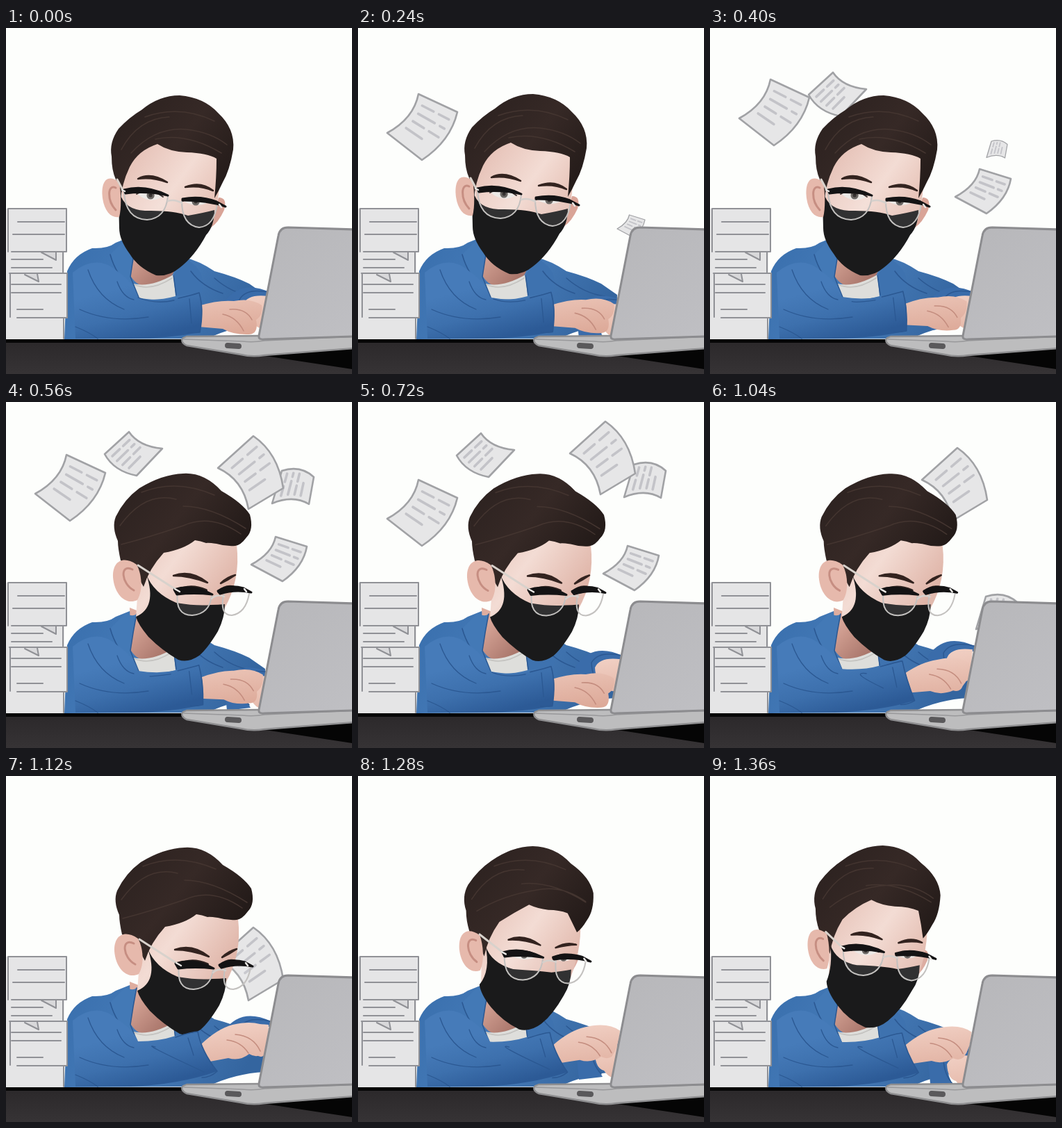
Recreate the animation shown at these times as an HTML page with a canvas. Size 498 px wide and 498 px high, loop 1.44 s.

```html
<!DOCTYPE html>
<html lang="en">
<head>
<meta charset="utf-8">
<title>Busy at the desk</title>
<style>
html, body { margin: 0; width: 100%; height: 100%; overflow: hidden; background: #fdfefc; }
canvas { display: block; }
</style>
</head>
<body>
<canvas id="stage" width="498" height="498"></canvas>
<script>
const ctx = document.getElementById('stage').getContext('2d');
const LOOP = 1440, STEP = 80;
const NUMBER = /-?\d*\.?\d+/g;
ctx.lineCap = ctx.lineJoin = 'round';

function gradient(x0, y0, x1, y1, ...colors) {
  const g = ctx.createLinearGradient(x0, y0, x1, y1);
  colors.forEach((c, i) => g.addColorStop(i / (colors.length - 1), c));
  return g;
}
const denim = gradient(90, 320, 330, 450, '#3a70ae', '#477cb9', '#34659f');
const sleeveBlue = gradient(180, 370, 200, 448, '#467bb9', '#3d70ad', '#2c5a96');
const skin = gradient(170, 170, 320, 280, '#e3bcb1', '#f3dcd4', '#deb2a5');
const handSkin = gradient(320, 355, 330, 442, '#f1d0c4', '#dca897');
const neckSkin = gradient(180, 310, 230, 360, '#dfad9f', '#a9766b');
const hair = gradient(160, 110, 320, 240, '#2b211f', '#362926', '#211917');
const metal = gradient(370, 290, 498, 446, '#b7b7ba', '#bfbfc3');
const desk = gradient(0, 453, 0, 498, '#2c292b', '#363335');
const FOLD = '#2b5892', GREY = '#909196';

function draw(path, fill, stroke, width = 2) {
  const p = new Path2D(path);
  if (fill) { ctx.fillStyle = fill; ctx.fill(p); }
  if (stroke) { ctx.strokeStyle = stroke; ctx.lineWidth = width; ctx.stroke(p); }
}

// Blends two paths that share the same commands.
function mix(a, b, amount) {
  const to = b.match(NUMBER);
  let i = 0;
  return a.replace(NUMBER, n => (+n + (to[i++] - n) * amount).toFixed(2) + ' ');
}

// Linear value through [time, value] pairs.
function track(keys, t) {
  const i = Math.max(1, keys.findIndex(k => k[0] >= t));
  const [t0, v0] = keys[i - 1], [t1, v1] = keys[i];
  return v0 + (v1 - v0) * (t - t0) / (t1 - t0);
}

const turnKeys = [[0, 0], [400, 0], [560, 1], [1120, 1], [1360, .32], [1440, 0]];
const headX = [[0, 0], [240, 2], [400, 0], [560, 0], [720, 3], [880, 4], [1120, 2], [1360, -3], [1440, 0]];
const headY = [[0, 0], [240, -2], [400, 0], [560, 0], [880, 1], [1120, 0], [1360, 1], [1440, 0]];
const nearLift = [[0, 0], [240, .05], [400, .15], [560, .18], [880, -.12], [1120, 1], [1360, .85], [1440, 0]];
const farDrop = [[0, 33], [240, 45], [400, 33], [560, 42], [800, 5], [880, 0], [1120, 5], [1360, 50], [1440, 33]];

// Distance below the highest point, one value per step after launch.
const flight = [0, 0, 59, 21, 9, 0, 0, 2, 13, 38, 190, 420];
// Corners run top-left, top-right, bottom-right, bottom-left of the sheet.
const sheets = [
  { delay: 0, bend: 1, corners: [[87, 74], [143, 100], [92, 169], [42, 130]] },
  { delay: 2, bend: -1, corners: [[142, 75], [177, 43], [225, 67], [188, 106]] },
  { delay: 1, bend: 1, corners: [[388, 194], [433, 208], [398, 258], [353, 234]] },
  { delay: 3, bend: 1, corners: [[383, 137], [397, 90], [443, 99], [436, 138]] },
  { delay: 4, bend: 1, corners: [[305, 74], [356, 28], [399, 103], [349, 133]] }
];

function drawSheet({ delay, bend, corners: [a, b, c, d] }, step) {
  const age = step - delay;
  if (age < 2 || age >= flight.length) return;
  const at = (u, v) => [0, 1].map(k =>
    (a[k] * (1 - u) + b[k] * u) * (1 - v) + (d[k] * (1 - u) + c[k] * u) * v
    + bend * .56 * v * (1 - v) * (b[k] - a[k]));
  const side = u => [0, 1].map(k => 2 * at(u, .5)[k] - (at(u, 0)[k] + at(u, 1)[k]) / 2);
  const cx = (a[0] + c[0]) / 2, cy = (a[1] + c[1]) / 2, size = age === 2 ? .5 : 1;
  ctx.save();
  ctx.translate(cx, cy + flight[age]);
  ctx.scale(size, size);
  ctx.translate(-cx, -cy);
  draw(`M${a}L${b}Q${side(1)} ${c}L${d}Q${side(0)} ${a}Z`, '#e6e6e7', '#a1a2a5', 2.6);
  [.18, .36, .54, .72].forEach((v, row) => {
    draw(`M${at(.16, v)}L${at(row % 2 ? .6 : .46, v)}`, null, '#c3c3c8', 3.6);
    if (row < 3) draw(`M${at(row % 2 ? .74 : .6, v)}L${at(.86, v)}`, null, '#c3c3c8', 3.6);
  });
  ctx.restore();
}

function drawBody() {
  draw('M84 448L88 350Q98 326 124 317Q146 318 158 309L178 301L256 330Q278 335 300 350Q330 358 350 368L373 384L372 426Q330 428 290 447Z', denim);
  draw('M178 296L180 358Q190 374 210 372Q236 366 242 350L238 320Z', neckSkin);
  draw('M183 368Q208 374 241 355L244 386Q215 394 190 389Z', '#dededb');
  draw('M184 369Q208 380 239 360', null, '#c4c3c0', 1.5);
  draw('M172 304Q182 310 188 305Q183 330 179 358Q190 384 192 392Q158 360 150 326Z', '#4379b6');
  draw('M188 305Q183 330 179 358L192 390M150 326Q158 356 184 380', null, FOLD, 1.5);
  draw('M262 334Q247 345 241 356L245 386L282 380Q288 350 262 334Z', '#3e72af');
  draw('M241 356L245 384M266 350Q282 372 312 382M300 360Q325 382 355 386', null, FOLD, 1.5);
}

function drawHead(turn) {
  const part = (front, side, fill, stroke, width) => draw(mix(front, side, turn), fill, stroke, width);
  part('M306 244Q319 244 314 262Q306 280 294 288Z', 'M318 260Q322 262 320 270Q316 280 312 285Z', '#d9a497');
  part('M166 222Q178 190 200 165Q250 160 306 182Q312 225 298 282Q240 306 168 280Z',
       'M192 240Q215 205 240 195Q300 190 332 206Q338 256 314 298Q240 320 187 310Z', skin);
  part('M164 238Q170 261 200 263Q240 262 262 270Q285 266 300 262Q300 285 288 298Q272 328 250 345Q235 358 216 356Q190 345 178 325Q163 305 163 288Q162 260 164 238Z',
       'M202 248Q212 275 245 289Q275 294 295 292Q305 292 315 291Q315 310 305 330Q290 355 278 365Q262 376 248 371Q225 358 205 338Q190 320 187 309Q218 296 202 248Z', '#1a1a1b');
  part('M158 218Q152 205 152 185Q148 165 162 145Q178 128 195 118Q220 97 250 97Q285 100 305 122Q330 145 327 175Q322 205 312 222Q306 235 300 245Q303 215 303 188Q290 180 260 179Q235 178 218 167Q190 176 178 200Q166 225 165 250Q160 235 158 218Z',
       'M165 228Q161 210 161 200Q152 180 158 165Q170 140 192 124Q225 104 255 103Q285 101 310 128Q340 145 351 162Q357 184 346 195Q338 206 330 207Q316 208 303 204Q290 202 288 203Q280 200 272 199Q256 212 227 217Q206 240 198 266Q188 245 165 228Z', hair);
  part('M166 175Q190 130 235 128M180 180Q215 142 260 146Q295 150 318 168M200 128Q250 110 300 134M215 160Q260 150 310 180',
       'M164 178Q200 128 245 140M166 205Q205 195 255 178Q295 160 338 190M195 130Q245 110 300 134M255 150Q295 150 345 182', null, '#443530', 1.5);
  part('M163 222C145 208 136 222 139 245C142 265 152 274 163 272C166 260 166 240 163 222Z',
       'M188 234C168 220 153 230 154 252C156 277 172 293 189 285C198 270 195 246 188 234Z', '#e6b9ac');
  part('M158 230C146 224 145 248 158 262', 'M182 241C163 232 166 262 184 271', null, '#c68e82', 3);

  // Eyes and brows
  part('M189 239Q206 227 225 243Q207 254 189 239Z', 'M247 272Q264 262 287 272Q268 281 247 272Z', '#eae6e3');
  part('M255 249Q273 240 291 251Q274 260 255 249Z', 'M307 273Q317 264 328 268Q320 279 307 273Z', '#eae6e3');
  part('M208 241L208.2 241M273 250L273.2 250', 'M267 271L267.2 271M317 271L317.2 271', null, '#5b5754', 11 - 3 * turn);
  part('M208 241L208.2 241M273 250L273.2 250', 'M267 271L267.2 271M317 271L317.2 271', null, '#211d1c', 5);
  part('M188 239Q206 227 226 243M254 249Q273 239 292 251', 'M246 272Q264 261 288 271M306 273Q317 263 329 267', null, '#2b201e', 2 + 2 * turn);
  part('M190 217Q208 207 232 222Q210 214 190 217Z', 'M241 250Q266 241 290 260Q264 250 241 250Z', '#33231f', '#33231f', 2.5);
  part('M258 229Q280 220 298 234Q280 226 258 229Z', 'M309 261Q318 252 330 249Q320 256 309 261Z', '#33231f', '#33231f', 2.5);

  // Glasses
  part('M170 236Q172 275 203 276Q230 274 233 242', 'M247 274Q243 307 268 307Q293 305 296 279', 'rgba(255,255,255,.1)', '#c3c1bf', 2);
  part('M253 249Q253 284 278 287Q300 285 304 253', 'M314 274Q306 307 325 307Q345 304 350 276', 'rgba(255,255,255,.1)', '#c3c1bf', 2);
  part('M233 249Q243 246 253 252', 'M296 283Q303 276 314 280', null, '#d5d0cc', 2.5);
  part('M160 218L168 233', 'M190 235L243 269', null, '#d8d2cc', 3);
  part('M170 233Q200 225 233 241Q203 234 172 238Z', 'M242 270Q268 261 297 277Q270 274 246 277Z', '#141314', '#141314', 3);
  part('M254 246Q280 241 303 250L316 257Q290 248 254 248Z', 'M305 272Q320 262 342 268L353 274Q330 269 308 276Z', '#141314', '#141314', 3);
  part('M167 233L171 235M307 254L310 258', 'M243 269L250 273M343 269L346 273', null, '#e9e7e4', 2.5);
}

function drawArms(lift, drop) {
  ctx.save();
  ctx.translate(0, drop);
  draw('M314 362Q338 328 381 348L380 356Q346 349 341 366Q342 384 352 398L318 402Z', '#3a6caa');
  draw('M378 353Q348 349 341 365Q342 386 354 389Q366 406 374 394Z', handSkin);
  draw('M381 348Q346 340 336 358Q337 380 350 394', null, FOLD, 1.5);
  ctx.restore();

  const part = (low, high, fill, stroke, width) => draw(mix(low, high, lift), fill, stroke, width);
  part('M277 400Q306 391 328 393Q352 388 368 399Q370 414 360 420Q364 440 350 441Q328 442 312 433L277 430Z',
       'M281 386Q304 364 326 358Q360 350 378 363Q376 388 366 402Q358 405 350 400Q336 411 320 406L288 412Z', handSkin);
  part('M322 405Q345 403 354 420M312 412Q332 416 342 436', 'M330 372Q356 374 366 396M318 380Q338 382 349 399', null, '#c48d7f', 1.6);
  part('M96 352Q130 324 160 350Q184 366 190 388Q220 394 245 389L278 380Q286 400 279 438Q235 447 180 447L100 447Z',
       'M96 352Q130 324 160 350Q184 366 190 382Q220 382 244 374L276 368Q280 395 304 425Q250 444 180 447L100 447Z', sleeveBlue);
  part('M248 389Q270 384 278 381Q285 405 279 438Q268 439 262 438', 'M244 376Q268 368 276 368Q281 396 304 425Q294 434 282 434', null, FOLD, 1.6);
  part('M264 390L267 425M190 388Q215 398 242 392', 'M262 377Q270 402 285 426M190 382Q215 390 240 380', null, FOLD, 1.3);
  draw('M118 348Q132 390 170 405M106 405Q150 425 205 416M100 430Q120 438 132 447M160 365Q168 388 184 391', null, FOLD, 1.3);
}

function drawStack() {
  draw('M0 260H87V322H84V353H88V417H83V448H0Z', '#e5e5e6');
  draw('M3 260H87V322H8M82 322V353M5 353H88V417H16M83 417V447M3 260V322M6 353V416', null, GREY);
  draw('M17 279H84M10 297H84M8 333H53M8 345H66M8 369H79M8 381H79M16 405H53', null, GREY);
  draw('M51 323L72 334V323M27 355L47 365L45 354', '#d8d8da', GREY);
}

function drawDesk() {
  ctx.fillStyle = desk;
  ctx.fillRect(0, 448, 498, 50);
  ctx.fillStyle = '#050505';
  ctx.fillRect(0, 448, 498, 5);
  draw('M360 470L498 491V455Z', '#050505');
}

function drawLaptop() {
  draw('M260 444L364 443L502 444V461L372 471Q354 474 338 470L260 457Q250 452 255 446Z', '#bdbdbe', '#8f8f91', 2.4);
  draw('M256 448L340 451Q356 453 372 450L502 444', null, '#98989a', 1.5);
  draw('M319 457L335 458', null, '#5a595b', 8);
  draw('M364 443L392 299Q394 287 406 287L502 290V444L372 448Q363 449 364 443Z', metal, '#8c8c8f', 3);
}

function frame(now) {
  const step = Math.floor(now % LOOP / STEP), t = step * STEP;
  ctx.fillStyle = '#fdfefc';
  ctx.fillRect(0, 0, 498, 498);
  sheets.forEach(sheet => drawSheet(sheet, step));
  drawBody();
  ctx.save();
  ctx.translate(track(headX, t), track(headY, t));
  drawHead(track(turnKeys, t));
  ctx.restore();
  drawArms(track(nearLift, t), track(farDrop, t));
  drawStack();
  drawDesk();
  drawLaptop();
}

const start = performance.now();
function tick() {
  frame(performance.now() - start);
  requestAnimationFrame(tick);
}
tick();
</script>
</body>
</html>
```
